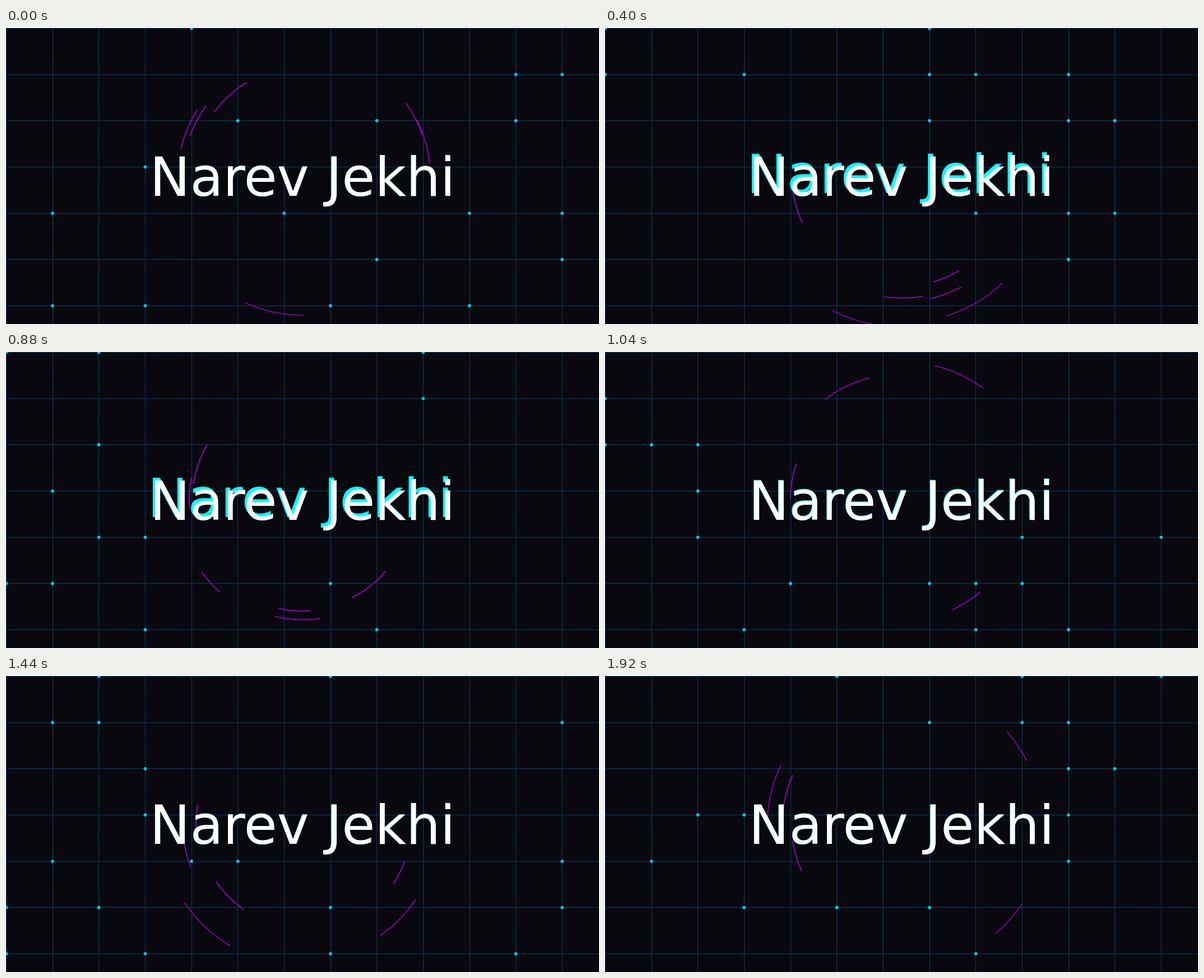
An HTML page with a canvas for the animation above (2 s loop, 1058x529 px).

```html
<!DOCTYPE html>
<html lang="en">
<head>
<meta charset="utf-8">
<title>Neon name</title>
<style>
  html, body { margin: 0; width: 100%; height: 100%; overflow: hidden; background: #08080e; }
  canvas { display: block; }
</style>
</head>
<body>
<canvas id="stage" width="1058" height="529"></canvas>
<script>
const ctx = document.getElementById("stage").getContext("2d");
const W = 1058, H = 529;
const SCALE = W / 1280, CELL = 100 * SCALE;
const COLUMNS = 13, ROWS = 7;
const STEP_MS = 80, STEPS = 25;
const ARC_COUNT = 6, NODE_CHANCE = 0.15;
const NAME = "Narev Jekhi";

// The same seed always gives the same sequence of values in [0, 1).
function seededRandom(seed) {
  let state = seed * 7919 + 17;
  return () => {
    state = (state + 0x6D2B79F5) | 0;
    let t = Math.imul(state ^ (state >>> 15), 1 | state);
    t = (t + Math.imul(t ^ (t >>> 7), 61 | t)) ^ t;
    return ((t ^ (t >>> 14)) >>> 0) / 4294967296;
  };
}

function drawGrid() {
  ctx.fillStyle = "#08080e";
  ctx.fillRect(0, 0, W, H);
  ctx.fillStyle = "#00406f";
  for (let i = 0; i < COLUMNS; i++) {
    const at = Math.round(i * CELL);
    ctx.fillRect(at, 0, 1, H);
    ctx.fillRect(0, at, W, 1);
  }
}

function drawNodes(random) {
  ctx.fillStyle = "#00c8f8";
  for (let row = 0; row < ROWS; row++) {
    for (let column = 0; column < COLUMNS; column++) {
      if (random() >= NODE_CHANCE) continue;
      ctx.beginPath();
      ctx.arc(column * CELL + 0.4, row * CELL + 0.4, 2.9, 0, Math.PI * 2);
      ctx.fill();
    }
  }
}

// A dotted arc around the centre, one dot every half degree.
function drawArc(random) {
  const radius = (220 + random() * 130) * SCALE;
  const start = Math.floor(random() * 360);
  const length = 12 + Math.floor(random() * 14);
  ctx.fillStyle = "#b800e0";
  for (let degrees = start; degrees <= start + length; degrees += 0.5) {
    const angle = degrees * Math.PI / 180;
    const x = W / 2 + radius * Math.cos(angle);
    const y = H / 2 + radius * Math.sin(angle);
    ctx.fillRect(x - 0.85, y - 0.85, 1.7, 1.7);
  }
}

function drawName(color, shift) {
  ctx.fillStyle = color;
  ctx.fillText(NAME, 529 - shift, 299.5 - shift);
}

function draw(now) {
  const step = Math.floor(now / STEP_MS) % STEPS;
  const random = seededRandom(step);
  drawGrid();
  drawNodes(random);
  for (let i = 0; i < ARC_COUNT; i++) drawArc(random);
  ctx.font = '96px "DejaVu Sans", sans-serif';
  ctx.textAlign = "center";
  drawName("#00ffff", (step % 6) * SCALE);
  drawName("#ffffff", 0);
}

let startTime;
function tick(now) {
  startTime ??= now;
  draw(now - startTime);
  requestAnimationFrame(tick);
}
draw(0);
requestAnimationFrame(tick);
</script>
</body>
</html>
```
